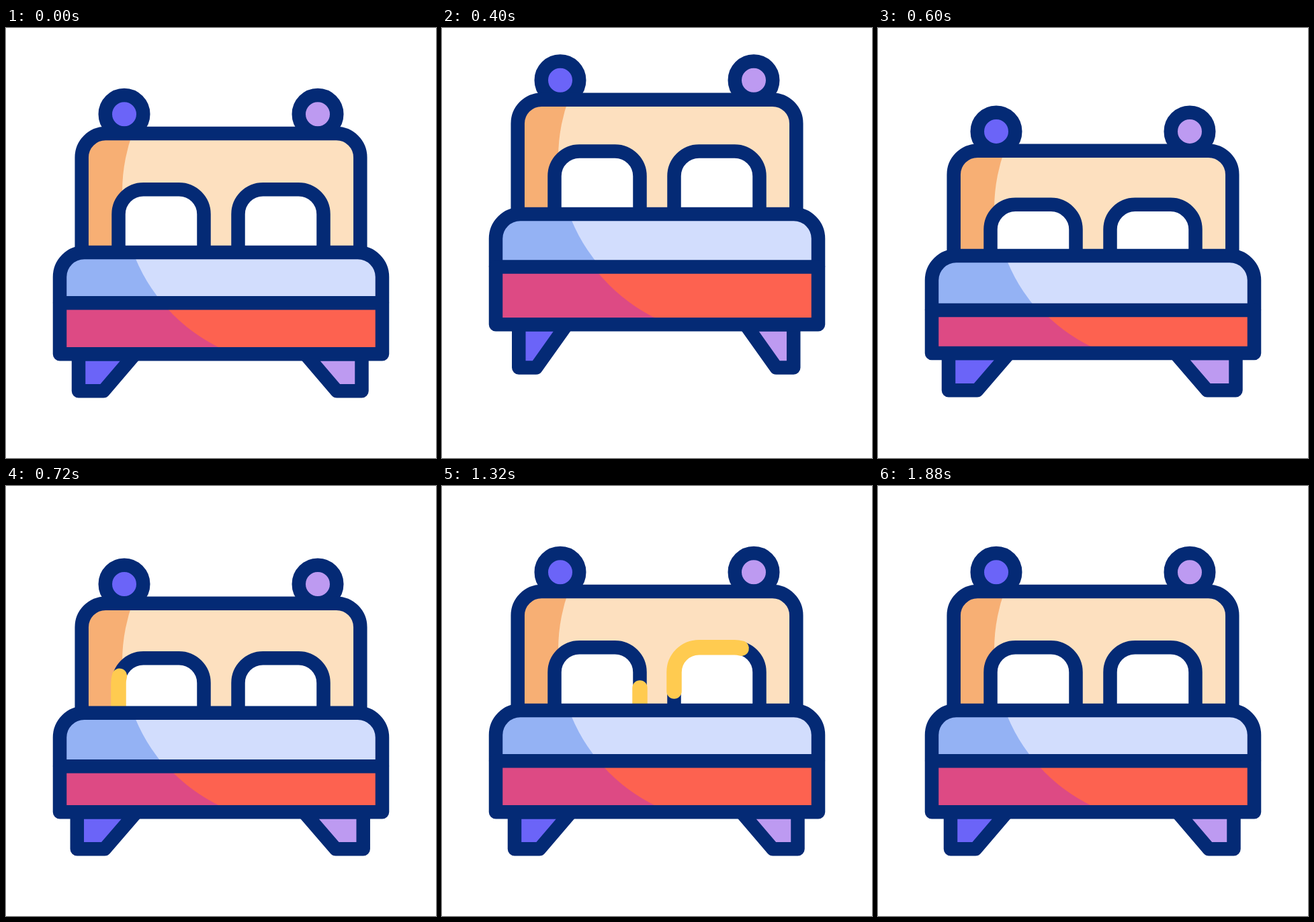
These frames come from a looping animation (640 px wide and 640 px high, 2 s). An HTML page with a canvas:

```html
<!DOCTYPE html>
<html lang="en">
<head>
<meta charset="utf-8">
<title>Bouncing bed</title>
<style>
  html, body { margin: 0; width: 100%; height: 100%; overflow: hidden; background: #fff; }
  canvas { display: block; }
</style>
</head>
<body>
<canvas width="640" height="640"></canvas>
<script>
const ctx = document.querySelector('canvas').getContext('2d');
const NAVY = '#042a75', YELLOW = '#ffcb50', VIOLET = '#6b64f8', LILAC = '#bd9af1';
const LOOP = 2000, STEP = 40, LINE = 20.5;

// Eased progress from 0 to 1 between two times
function ease(t, from, to) {
  const x = Math.min(1, Math.max(0, (t - from) / (to - from)));
  return x * x * (3 - 2 * x);
}

// Vertical offset: rise to the peak, land with some sag, settle
function hop(t, peak, sag, land) {
  return peak * ease(t, 147, 360) + (sag - peak) * ease(t, 360, land) - sag * ease(t, land, 960);
}

function stroke(path, color = NAVY, width = LINE) {
  ctx.strokeStyle = color;
  ctx.lineWidth = width;
  ctx.stroke(path);
}

function fill(path, color) {
  ctx.fillStyle = color;
  ctx.fill(path);
}

// Open arch with rounded upper corners, from lower left to lower right
function arch(left, right, top, bottom, r) {
  const p = new Path2D();
  p.moveTo(left, bottom);
  p.arcTo(left, top, left + r, top, r);
  p.arcTo(right, top, right, top + r, r);
  p.lineTo(right, bottom);
  return p;
}

// Dark shape whose right part is lit up to a large round edge
function shaded(path, dy, light, dark) {
  fill(path, dark);
  ctx.save();
  ctx.clip(path);
  const lit = new Path2D();
  lit.arc(431, 244 + dy, 258, -Math.PI / 2, Math.PI / 2, true);
  lit.lineTo(640, 502 + dy);
  lit.lineTo(640, -14 + dy);
  fill(lit, light);
  ctx.restore();
}

function leg(top, foot, splay, color, mirrored) {
  const x = v => mirrored ? 637.5 - v : v;
  const p = new Path2D();
  p.moveTo(x(108 - splay), top);
  p.lineTo(x(108 - splay), foot);
  p.lineTo(x(145 + splay * 0.8), foot);
  p.lineTo(x(192 + splay), top);
  p.closePath();
  fill(p, color);
  stroke(p);
}

function knob(x, y, color) {
  const p = new Path2D();
  p.arc(x, y, 28.25, 0, 7);
  fill(p, color);
  stroke(p);
}

// Pillow with a yellow streak running over its outline from tail to lead
function pillow(left, top, bottom, lead, tail) {
  const width = 127, r = 37;
  const p = arch(left, left + width, top, bottom, r);
  fill(p, '#fff');
  stroke(p);
  if (lead <= tail) return;
  const length = 2 * (bottom - top - r) + width - 2 * r + Math.PI * r;
  ctx.save();
  ctx.lineCap = 'round';
  ctx.setLineDash([(lead - tail) * length, 9999]);
  ctx.lineDashOffset = -tail * length;
  stroke(p, YELLOW, 22.5);
  ctx.restore();
}

function draw(t) {
  const headDy = hop(t, -58, 26, 575);
  const sheetDy = hop(t, -62, 5, 600);
  const baseDy = hop(t, -47, 0, 625);
  const sheet = 334 + sheetDy;
  const middle = 409.3 + hop(t, -59, 10.8, 600);
  const base = 485.3 + baseDy;
  const foot = 540.3 + hop(t, -37, 0, 625);
  const pillowTop = 240.2 + hop(t, -64, 22.7, 585);
  const splay = hop(t, -7, 3, 600);

  ctx.clearRect(0, 0, 640, 640);
  ctx.lineJoin = 'round';

  leg(base, foot, splay, VIOLET, false);
  leg(base, foot, splay, LILAC, true);

  knob(176, 128.2 + headDy, VIOLET);
  knob(464, 128.2 + headDy, LILAC);

  const head = arch(112.7, 527.3, 157 + headDy, sheet, 35.5);
  shaded(head, headDy, '#fde0bf', '#f7af74');
  stroke(head);

  pillow(167.5, pillowTop, sheet, ease(t, 600, 1003), ease(t, 780, 1468));
  pillow(345.5, pillowTop, sheet, ease(t, 1085, 1485), ease(t, 1185, 1871));

  const cover = arch(80, 560, sheet, middle, 36.5);
  shaded(cover, sheetDy, '#d2ddfd', '#94b2f4');
  const frame = new Path2D();
  frame.rect(80, middle, 480, base - middle);
  shaded(frame, baseDy, '#fd6250', '#dd4a84');
  stroke(cover);
  stroke(frame);
}

function tick(now) {
  draw(Math.floor(now % LOOP / STEP) * STEP);
  requestAnimationFrame(tick);
}
requestAnimationFrame(tick);
</script>
</body>
</html>
```
